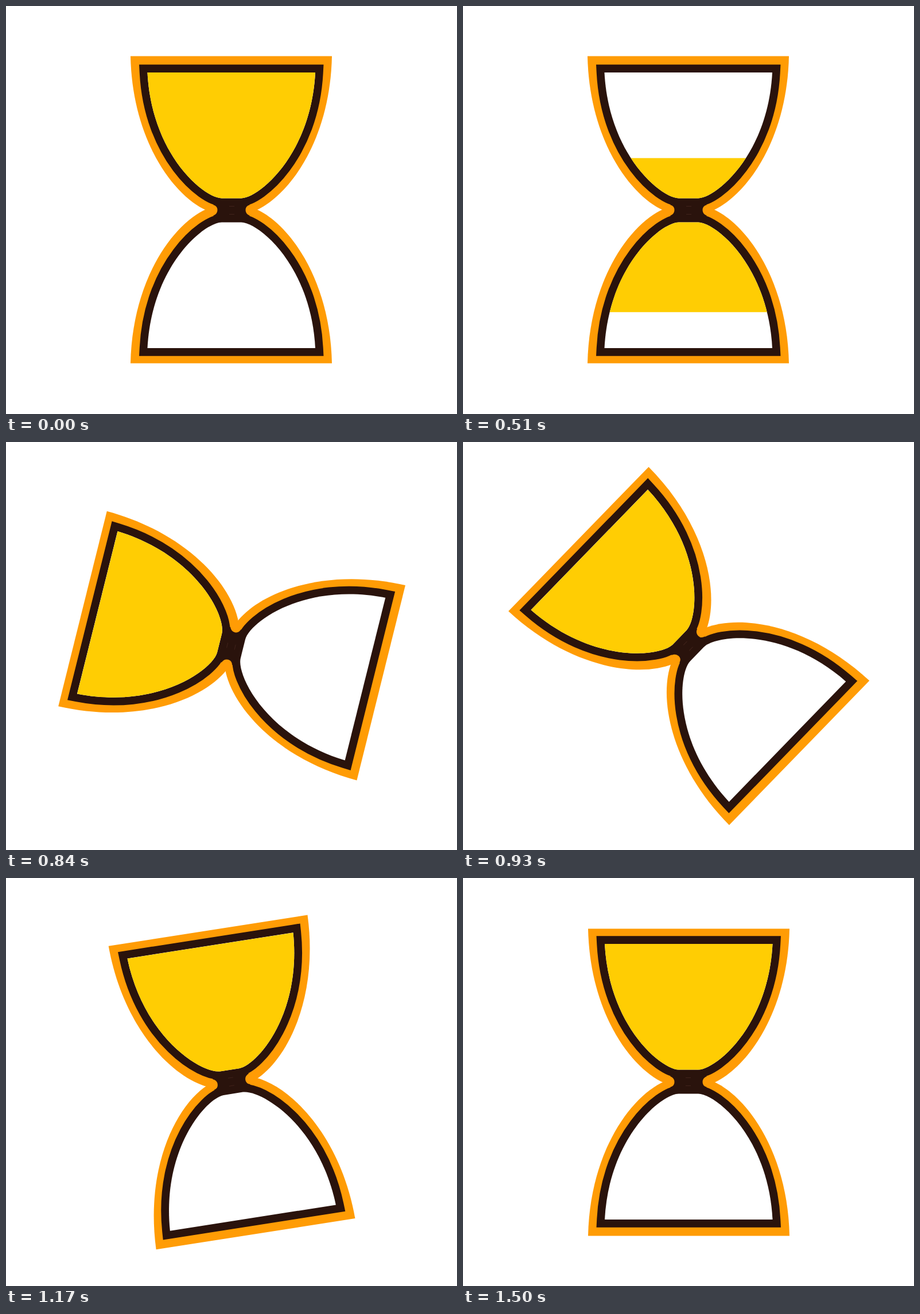
Animation, 786 px wide and 712 px high, one loop 1530 ms. Source, as an HTML page:

```html
<!DOCTYPE html>
<html lang="en">
<head>
<meta charset="utf-8">
<title>Hourglass</title>
<style>
  html, body { margin: 0; width: 100%; height: 100%; overflow: hidden; background: #fff; }
  svg { display: block; width: 100%; height: 100%; }
</style>
</head>
<body>
<svg viewBox="0 0 786 712">
  <defs>
    <path id="bulb" d="M246.5 116H539C531.5 260 440.5 335 410 335.5H376C345 335 254 260 246.5 116Z"/>
    <path id="shell" d="M217 87.5H568C565 233 494 331 435 357H350C291 331 220 233 217 87.5Z"/>
    <g id="bulbs">
      <use href="#bulb"/>
      <use href="#bulb" transform="translate(0 713) scale(1 -1)"/>
    </g>
    <clipPath id="inside">
      <use href="#bulb"/>
      <use href="#bulb" transform="translate(0 713) scale(1 -1)"/>
    </clipPath>
  </defs>
  <g id="glass">
    <g fill="#ff9c05">
      <use href="#shell"/>
      <use href="#shell" transform="translate(0 711) scale(1 -1)"/>
    </g>
    <use href="#bulbs" fill="#fff" stroke="#2a130c" stroke-width="27.5"/>
    <path fill="#2a130c" d="M361 347Q368.5 349 368.5 356Q368.5 363 361 366L376 377.5H411L425 366Q417.5 363 417.5 356Q417.5 349 425 347L411 335.5H376Z"/>
    <path fill="none" stroke="#40231b" d="M389 349.5H398M389 363.5H398"/>
    <use href="#bulbs" fill="#fff"/>
    <g clip-path="url(#inside)" fill="#ffcd03">
      <rect id="top" x="240" width="306"/>
      <rect id="bottom" x="240" y="360" width="306"/>
    </g>
  </g>
</svg>
<script>
  const LOOP = 1530, STEP = 30, POUR_END = 720, TURN = 750, END = 1500;
  const get = id => document.getElementById(id);
  const glass = get('glass'), upper = get('top'), lower = get('bottom');
  const cube = x => x * x * x;

  // Degrees left of the half turn: a quick flick that settles slowly.
  function remaining(t) {
    if (t <= TURN) return 180;
    const settle = 104.5 * cube(Math.max(0, (END - t) / 750));
    const flick = 75.5 * cube(Math.max(0, 1 - (t - TURN) / 150));
    return settle + flick;
  }

  function draw(t) {
    const pour = Math.min(t, POUR_END);
    const level = 92 + 0.34 * pour;
    upper.setAttribute('y', level);
    upper.setAttribute('height', Math.max(0, 337 - level));
    lower.setAttribute('height', 8.5 + 0.325 * pour);
    glass.setAttribute('transform', `rotate(${180 - remaining(t)} 393 356)`);
  }

  const start = performance.now();
  function tick() {
    const t = (performance.now() - start) % LOOP;
    draw(Math.floor(t / STEP) * STEP);
    requestAnimationFrame(tick);
  }
  tick();
</script>
</body>
</html>
```
